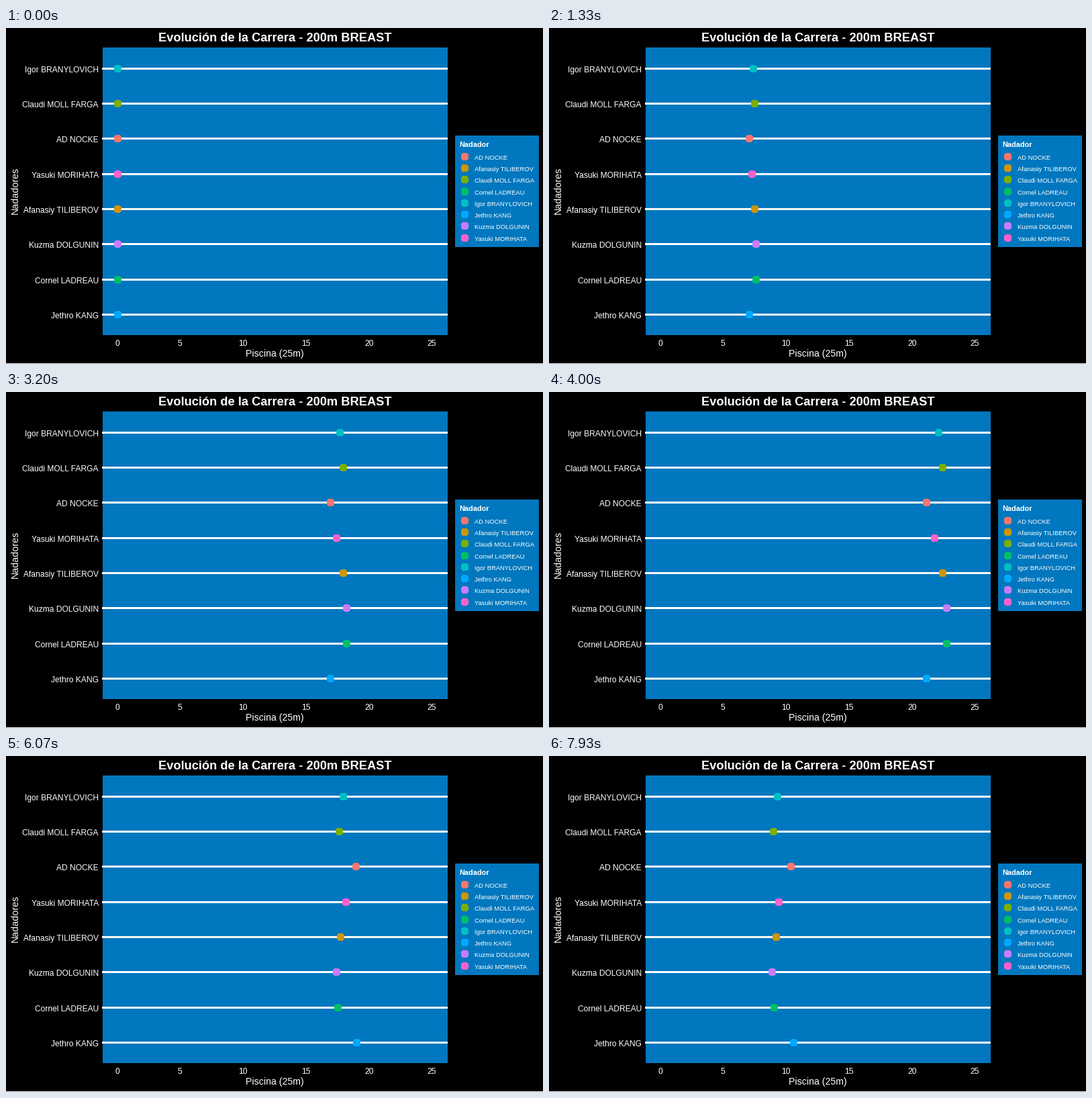
A matplotlib script for the animation above (8 s loop, 800 by 500 pixels).

```python
import matplotlib.pyplot as plt
from matplotlib.animation import FuncAnimation
from matplotlib.patches import Circle, Rectangle

W, H, DPI = 800, 500, 100
TICK_MS, TICKS = 20, 400          # one 8 s loop
START, WALL = 165.98, 634.98      # x of 0 m and 25 m
TOP, ROW_STEP = 60.3, 52.3
RADIUS = 5.5
POOL = "#0077be"

# name, colour, steps for the first length, steps for the second
SWIMMERS = [
    ("Igor BRANYLOVICH", "#00BFC4", 68, 81),
    ("Claudi MOLL FARGA", "#7CAE00", 67, 81),
    ("AD NOCKE", "#F8766D", 71, 82),
    ("Yasuki MORIHATA", "#FF61CC", 69, 80),
    ("Afanasiy TILIBEROV", "#CD9600", 67, 82),
    ("Kuzma DOLGUNIN", "#C77CFF", 66, 82),
    ("Cornel LADREAU", "#00BE67", 66, 83),
    ("Jethro KANG", "#00A9FF", 71, 83),
]

plt.rcParams["font.family"] = ["Liberation Sans"]
fig = plt.figure(figsize=(W / DPI, H / DPI), dpi=DPI, facecolor="black")
ax = fig.add_axes([0, 0, 1, 1])
ax.set_xlim(0, W)
ax.set_ylim(H, 0)
ax.axis("off")


def box(x0, y0, x1, y1, color):
    ax.add_patch(Rectangle((x0, y0), x1 - x0, y1 - y0, color=color,
                           linewidth=0, antialiased=False))


def label(x, y, text, px, **kw):
    ax.text(x, y, text, fontsize=px * 72 / DPI, color="white",
            va="baseline", rotation_mode="anchor", **kw)


def dot(x, y, color):
    return ax.add_patch(Circle((x + 0.5, y + 0.5), RADIUS, facecolor=color,
                               linewidth=0, antialiased=False, zorder=3))


def position(step, out, back):
    span = WALL - START
    if step <= out:
        return START + span * step / out
    return WALL - span * (step - out) / back


# Pool, titles and axis
box(0, 499, W, H, "white")
box(144, 29, 658, 457, POOL)
label(400.5, 20, "Evolución de la Carrera - 200m BREAST", 18.25,
      ha="center", weight="bold")
label(400, 489, "Piscina (25m)", 14.1, ha="center")
label(18, 242, "Nadadores", 14.2, ha="center", rotation=90)
for metres in range(0, 26, 5):
    x = START + (WALL - START) * metres / 25
    label(x - 0.5, 473, str(metres), 12, ha="center")

# Lanes
dots = []
for i, (name, color, *_) in enumerate(SWIMMERS):
    y = int(TOP + ROW_STEP * i)
    box(143, y - 1, 658, y + 2, "white")
    label(138, y + 6, name, 12, ha="right")
    dots.append(dot(round(START), y, color))

# Legend
box(669, 160, 794, 326, POOL)
label(675, 177, "Nadador", 10.9, weight="bold")
for i, (name, color, *_) in enumerate(sorted(SWIMMERS)):
    y = int(191.2 + 17.28 * i)
    dot(683, y, color)
    label(698, y + 5, name, 9.4)


def update(tick):
    step = (3 * tick + 2) // 10   # 15 steps per second
    for d, (_, _, out, back) in zip(dots, SWIMMERS):
        d.set_center((round(position(step, out, back)) + 0.5, d.center[1]))
    return dots


anim = FuncAnimation(fig, update, frames=TICKS, interval=TICK_MS,
                     repeat=True, repeat_delay=0, blit=False)
plt.show()
```
